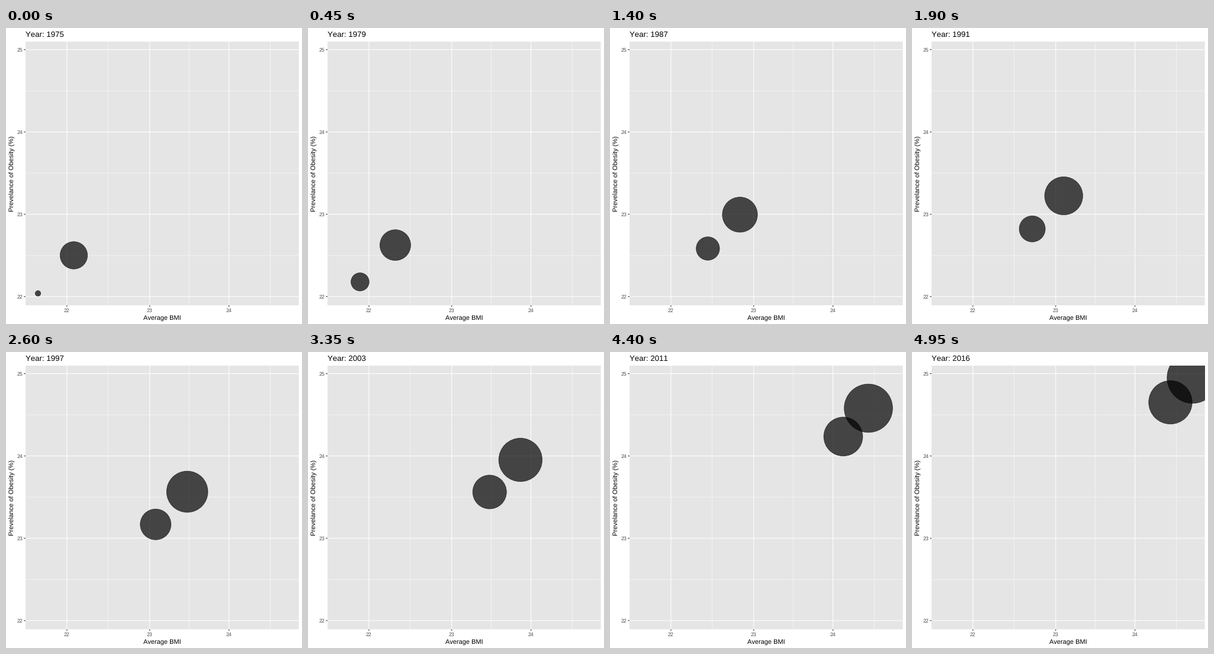
These frames come from a looping animation (500x500 px, 5000 ms). A matplotlib script:

```python
import numpy as np
import matplotlib.pyplot as plt
from matplotlib.animation import FuncAnimation
from matplotlib.patches import Circle, Rectangle

SIZE, DPI = 500, 100
FRAMES, INTERVAL = 100, 50
FIRST_YEAR, SPAN = 1975, 41
PX = 72 / DPI  # points per pixel

LEFT, TOP, RIGHT, BOTTOM = 33, 23, 494.6, 468.4
RIM = 0.7

plt.rcParams.update({
    "font.family": "Liberation Sans",
    "text.hinting": "none",
    "text.kerning_factor": 6,
    "toolbar": "None",
})

fig = plt.figure(figsize=(SIZE / DPI, SIZE / DPI), dpi=DPI, facecolor="white")
ax = fig.add_axes([0, 0, 1, 1])
ax.set(xlim=(0, SIZE), ylim=(SIZE, 0))
ax.axis("off")


def line(x0, y0, x1, y1, color="white", width=1.07):
    ax.plot([x0, x1], [y0, y1], color=color, lw=width * PX, zorder=1,
            solid_capstyle="butt", snap=False)


def label(x, y, text, size, color="black", **kw):
    return ax.text(x, y, text, fontsize=size * PX, color=color, **kw)


def x_pos(bmi):
    """Logarithmic horizontal scale."""
    return 102.9 + 3146 * np.log(bmi / 22)


def y_pos(value):
    return 453.7 - 139.05 * (value - 22)


panel = Rectangle((LEFT, TOP), RIGHT - LEFT, BOTTOM - TOP,
                  fc="#e5e5e5", ec="none", zorder=0, snap=False)
ax.add_patch(panel)

# Minor grid below, then major grid with ticks and numbers
half = (x_pos(23) - x_pos(22)) / 2
for v in (22, 23, 24):
    x = x_pos(v) + half if v != 23 else (x_pos(23) + x_pos(24)) / 2
    line(x, TOP, x, BOTTOM, width=0.55)
    line(LEFT, y_pos(v + 0.5), RIGHT, y_pos(v + 0.5), width=0.55)

for v in (22, 23, 24, 25):
    x, y = x_pos(v), y_pos(v)
    line(LEFT, y, RIGHT, y)
    line(LEFT - 2.75, y, LEFT, y, "#333333")
    label(28.1, y + 3.2, v, 8.8, "#4d4d4d", ha="right")
    if x < RIGHT:
        line(x, TOP, x, BOTTOM)
        line(x, BOTTOM, x, BOTTOM + 2.75, "#333333")
        label(x, 480, v, 8.8, "#4d4d4d", ha="center")

label((LEFT + RIGHT) / 2, 493, "Average BMI", 11, ha="center")
label(14, (TOP + BOTTOM) / 2, "Prevelance of Obesity (%)", 11,
      rotation=90, rotation_mode="anchor", ha="center")
title = label(LEFT, 15, "", 13.2)

years = np.arange(SPAN + 1)
# Each year begins on a whole frame, so years last two or three frames
year_starts = np.round(years * (FRAMES - 1) / SPAN)


class Bubble:
    """Circle on a smooth path through evenly timed key points.

    Its area follows a polynomial trend cut to whole numbers each year.
    """

    def __init__(self, points, trend):
        times = np.linspace(0, 1, len(points))
        self.path = np.polyfit(times, points, len(points) - 1)
        levels = np.floor(np.polyval(trend, years))
        self.radii = 5 + 38.5 * np.sqrt(levels / 13)
        self.patch = Circle((0, 0), 1, fc=(0, 0, 0, 0.7), ec=(0, 0, 0, 0.7),
                            lw=RIM * PX, zorder=3)
        ax.add_patch(self.patch)
        self.patch.set_clip_path(panel)

    def move(self, year):
        s = year / SPAN
        self.patch.center = [np.polyval(c, s) for c in self.path.T]
        self.patch.set_radius(np.interp(year, years, self.radii) - RIM / 2)


bubbles = [
    Bubble([(114.5, 384), (189.4, 338.7), (262.6, 277.7),
            (332.5, 209.5), (403.9, 133.4), (474, 43.5)],
           trend=(0.2364, 3.3475)),
    Bubble([(54, 448.3), (133.3, 397.7), (209.5, 333.4),
            (279.3, 264.4), (356.4, 184.9), (436.5, 85)],
           trend=(0.00206, 0.1207, 0.62)),
]


def update(i):
    year = np.interp(i, year_starts, years)
    for bubble in bubbles:
        bubble.move(year)
    title.set_text(f"Year: {round(FIRST_YEAR + SPAN * i / (FRAMES - 1))}")
    return [title] + [b.patch for b in bubbles]


anim = FuncAnimation(fig, update, frames=FRAMES, interval=INTERVAL,
                     init_func=lambda: update(0), repeat=True,
                     repeat_delay=0, blit=False)
plt.show()
```
